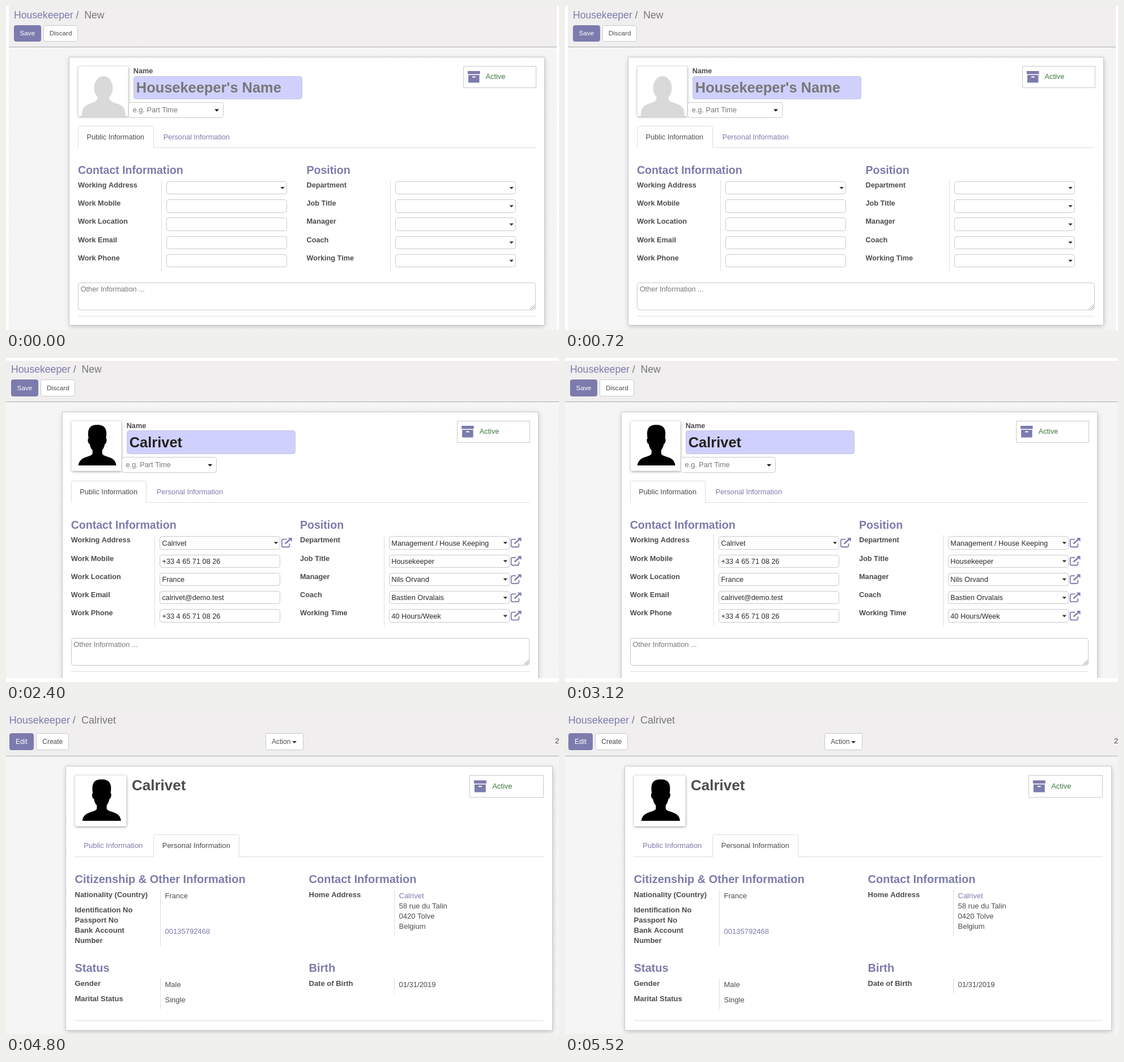
Recreate the animation shown at these times as an HTML page with a canvas. Size 976 by 573 pixels, loop 6 s.

```html
<!DOCTYPE html>
<html lang="en">
<head>
<meta charset="utf-8">
<title>Housekeeper form</title>
<style>
  html, body { margin: 0; width: 100%; height: 100%; overflow: hidden; background: #fff; }
  canvas { display: block; }
</style>
</head>
<body>
<canvas id="stage" width="976" height="573"></canvas>
<script>
const ctx = document.getElementById('stage').getContext('2d');
const BRAND = '#7c7bad', DARK = '#4c4c4c', INK = '#2b2b2b', HINT = '#777', EDGE = '#c9c9c9', RULE = '#ddd';
const COMPANY = 'Calrivet', PHONE = '+33 4 65 71 08 26', ACCOUNT = '00135792468';
const STEP = 1200;

// Current mapping from form units to stage pixels
let k = 1, ox = 0, oy = 0, fontScale = 1;
function view(scale, x, y, fs = scale * 0.978) {
  k = scale; ox = x; oy = y; fontScale = fs;
}
const X = x => x * k + ox;
const Y = y => y * k + oy;
const PX = x => Math.round(X(x));
const PY = y => Math.round(Y(y));

function text(str, x, y, { size = 13, color = DARK, bold = false, align = 'left' } = {}) {
  const s = size * fontScale;
  ctx.font = `${bold ? 'bold ' : ''}${s}px "Liberation Sans", Arial, sans-serif`;
  ctx.textAlign = align;
  ctx.fillStyle = color;
  ctx.fillText(str, X(x), Y(y) + s * 0.355);
}

function box(x0, y0, x1, y1, { r = 0, fill = '#fff', edge = EDGE, blur = 0, shade = 'rgba(0,0,0,.3)', drop = 1 } = {}) {
  const l = PX(x0) + 0.5, t = PY(y0) + 0.5;
  ctx.beginPath();
  ctx.roundRect(l, t, PX(x1) - l - 0.5, PY(y1) - t - 0.5, r);
  ctx.save();
  if (blur) {
    ctx.shadowColor = shade;
    ctx.shadowBlur = blur;
    ctx.shadowOffsetY = drop;
  }
  ctx.fillStyle = fill;
  ctx.fill();
  ctx.restore();
  ctx.strokeStyle = edge;
  ctx.lineWidth = 1;
  ctx.stroke();
}

function hline(x0, x1, y, color = RULE) {
  ctx.fillStyle = color;
  ctx.fillRect(PX(x0), PY(y), PX(x1) - PX(x0), 1);
}
function vline(x, y0, y1) {
  ctx.fillStyle = RULE;
  ctx.fillRect(PX(x), PY(y0), 1, PY(y1) - PY(y0));
}

function caret(x, y, w = 7.5, h = 4, color = '#333') {
  const cx = X(x), cy = Y(y);
  ctx.fillStyle = color;
  ctx.beginPath();
  ctx.moveTo(cx - w / 2, cy - h / 2);
  ctx.lineTo(cx + w / 2, cy - h / 2);
  ctx.lineTo(cx, cy + h / 2);
  ctx.fill();
}

// Draws in form units through the canvas transform
function scaled(draw) {
  ctx.save();
  ctx.translate(ox, oy);
  ctx.scale(k, k);
  draw();
  ctx.restore();
}

function linkIcon(x, y) {
  scaled(() => {
    ctx.translate(x, y);
    ctx.scale(1.05, 1.05);
    ctx.strokeStyle = ctx.fillStyle = BRAND;
    ctx.lineWidth = 1.7;
    ctx.beginPath();
    ctx.moveTo(0, -5.5);
    ctx.lineTo(-5.5, -5.5);
    ctx.quadraticCurveTo(-8, -5.5, -8, -3);
    ctx.lineTo(-8, 5);
    ctx.quadraticCurveTo(-8, 7.5, -5.5, 7.5);
    ctx.lineTo(2.5, 7.5);
    ctx.quadraticCurveTo(5, 7.5, 5, 5);
    ctx.lineTo(5, 1.5);
    ctx.stroke();
    ctx.lineWidth = 2.4;
    ctx.beginPath();
    ctx.moveTo(-2.5, 2);
    ctx.lineTo(6, -5.5);
    ctx.stroke();
    ctx.beginPath();
    ctx.moveTo(2.5, -8);
    ctx.lineTo(9, -8);
    ctx.lineTo(9, -1.5);
    ctx.fill();
  });
}

function greyPerson() {
  ctx.fillStyle = '#d9d9d9';
  ctx.beginPath();
  ctx.ellipse(172, 145, 16.5, 21, 0, 0, Math.PI * 2);
  ctx.fill();
  ctx.beginPath();
  ctx.moveTo(134, 194);
  ctx.bezierCurveTo(134, 178, 141, 175, 150, 172);
  ctx.bezierCurveTo(159, 169, 162, 168, 162, 158);
  ctx.lineTo(182, 158);
  ctx.bezierCurveTo(182, 168, 185, 169, 194, 172);
  ctx.bezierCurveTo(204, 175, 211, 178, 211, 194);
  ctx.fill();
}

function blackPerson() {
  ctx.fillStyle = '#000';
  ctx.beginPath();
  ctx.moveTo(158, 137);
  ctx.bezierCurveTo(155.5, 120, 160, 113.3, 173.3, 113.3);
  ctx.bezierCurveTo(187, 113.3, 191.5, 121, 188.8, 137);
  ctx.bezierCurveTo(191, 138, 189.5, 147, 186.7, 147);
  ctx.bezierCurveTo(185.5, 153, 183.5, 156, 182, 158);
  ctx.lineTo(182, 164);
  ctx.bezierCurveTo(183.5, 169, 194.5, 169, 201, 174);
  ctx.bezierCurveTo(205, 177, 206.2, 181, 206.7, 185);
  ctx.lineTo(140, 185);
  ctx.bezierCurveTo(140.5, 181, 142, 177, 146, 174);
  ctx.bezierCurveTo(152.5, 169, 163.5, 169, 165, 164);
  ctx.lineTo(165, 158);
  ctx.bezierCurveTo(163, 156, 161, 153, 160, 147);
  ctx.bezierCurveTo(157, 147, 155.5, 138, 158, 137);
  ctx.fill();
}

const tile = document.createElement('canvas');
tile.width = tile.height = 4;
const tc = tile.getContext('2d');
tc.fillStyle = '#fdfdfd';
tc.fillRect(0, 0, 4, 4);
tc.fillStyle = '#e7e7e7';
for (let i = 0; i < 4; i++) {
  tc.fillRect(i, i, 1, 1);
  tc.fillRect(i, (4 - i) % 4, 1, 1);
}
const weave = ctx.createPattern(tile, 'repeat');

function button(x0, x1, label, main) {
  box(x0, 33.5, x1, 62.7, main ? { r: 3, fill: BRAND, edge: BRAND } : { r: 3 });
  text(label, (x0 + x1) / 2, 48, { size: 12, color: main ? '#fff' : DARK, align: 'center' });
}

function page(title, left, titleY, bottom) {
  ctx.fillStyle = weave;
  ctx.fillRect(0, 0, 976, 573);
  ctx.fillStyle = '#f0eeee';
  ctx.fillRect(0, 0, 976, PY(72.4));
  hline(-30, 1020, 72.4, '#adacae');
  text('Housekeeper', left, titleY, { size: 18, color: BRAND });
  text('/', left + 109.5, titleY, { size: 18, color: HINT });
  text(title, left + 124.3, titleY, { size: 18, color: HINT });
  box(111, 90, 951, bottom, { edge: '#c8c8d3', blur: 9, shade: 'rgba(0,0,0,.24)', drop: 2 });
}

function avatar(known) {
  box(127, 105.6, 216, 194.6, { edge: '#e6e6e6', blur: 5, shade: 'rgba(0,0,0,.45)' });
  scaled(known ? blackPerson : greyPerson);
}

function activeBox() {
  box(807, 106, 935.5, 144.7);
  scaled(() => {
    ctx.fillStyle = BRAND;
    ctx.fillRect(815, 115, 21.5, 5.5);
    ctx.fillRect(816, 122, 19.5, 13.5);
    ctx.fillStyle = '#fff';
    ctx.fillRect(823, 124.5, 5.5, 2);
  });
  text('Active', 846.6, 124.8, { color: '#3c763d' });
}

function tabs(second, dy = 0) {
  hline(127, 935, 250 + dy);
  const [l, r] = second ? [262.6, 410.7] : [127, 260.5];
  const b = PY(250 + dy) + 1, t = PY(212 + dy) + 0.5;
  const x0 = PX(l) + 0.5, x1 = PX(r) - 0.5;
  ctx.beginPath();
  ctx.moveTo(x0, b);
  ctx.lineTo(x0, t + 3);
  ctx.quadraticCurveTo(x0, t, x0 + 3, t);
  ctx.lineTo(x1 - 3, t);
  ctx.quadraticCurveTo(x1, t, x1, t + 3);
  ctx.lineTo(x1, b);
  ctx.fillStyle = '#fff';
  ctx.fill();
  ctx.strokeStyle = RULE;
  ctx.stroke();
  text('Public Information', 142.5, 231.1 + dy, { color: second ? BRAND : DARK });
  text('Personal Information', 277.7, 231.1 + dy, { color: second ? DARK : BRAND });
}

const heading = (str, x, y) => text(str, x, y, { size: 20, color: BRAND, bold: true });
const label = (str, x, y) => text(str, x, y, { bold: true });

// kind: 'text', 'combo', 'link' (combo with a link icon) or 'select'
function field(right, top, name, kind, value = '') {
  const lx = right ? 530.5 : 127, x = right ? 686.8 : 282.8, mid = top + 11.7;
  name.split('|').forEach((part, i) => label(part, lx, top + 6.5 + i * 17.7));
  box(x, top, x + 213, top + 23.3, { r: 4 });
  if (kind === 'select') caret(x + 204.5, mid, 6, 6, '#111');
  else if (kind !== 'text') caret(x + 205.3, mid + 0.3);
  if (value) text(value, x + (kind === 'select' ? 8.5 : 4.7), mid, { color: INK });
  if (kind === 'link' && value) linkIcon(x + 224, mid - 0.7);
}

function editForm(known, second) {
  const left = known ? 21.6 : 14;
  page('New', left, 15.5, second ? 595.5 : 564.7);
  button(left, left + 47.7, 'Save', true);
  button(left + 52, left + 113.2, 'Discard');
  avatar(known);
  label('Name', 224.8, 114.3);
  box(224.8, 123.5, 523, 165.3, { r: 4, fill: '#d0d0ff', edge: '#c6c6dc' });
  text(known ? COMPANY : "Housekeeper's Name", 229.8, 144, { size: 26, color: known ? '#222' : HINT, bold: true });
  box(215.8, 170.3, 384.3, 197.5, { r: 4 });
  text('e.g. Part Time', 223.7, 183.8, { color: HINT });
  caret(372, 184.7, 8, 4.2, '#111');
  activeBox();
  tabs(second);
  if (second) personalFields(known); else publicFields(known);
}

function publicFields(known) {
  const left = [
    ['Working Address', 'link', COMPANY], ['Work Mobile', 'text', PHONE],
    ['Work Location', 'text', 'France'], ['Work Email', 'text', 'calrivet@demo.test'],
    ['Work Phone', 'text', PHONE]
  ];
  const right = [
    ['Department', 'Management / House Keeping'], ['Job Title', 'Housekeeper'],
    ['Manager', 'Nils Orvand'], ['Coach', 'Bastien Orvalais'], ['Working Time', '40 Hours/Week']
  ];
  heading('Contact Information', 127, 289.8);
  heading('Position', 530.5, 289.8);
  vline(274.4, 308, 469);
  vline(678, 308, 469);
  left.forEach(([n, kind, v], i) => field(false, 310 + i * 32.2, n, kind, known ? v : ''));
  right.forEach(([n, v], i) => field(true, 310 + i * 32.2, n, 'link', known ? v : ''));
  box(127, 489, 935, 538, { r: 4 });
  text('Other Information ...', 131.7, 500.7, { color: HINT });
  scaled(() => {
    ctx.strokeStyle = '#888';
    ctx.lineWidth = 1;
    ctx.beginPath();
    for (const d of [8, 4]) {
      ctx.moveTo(933.5 - d, 536.5);
      ctx.lineTo(933.5, 536.5 - d);
    }
    ctx.stroke();
  });
  hline(127, 935, 548);
}

function personalFields(known) {
  const v = s => known ? s : '';
  heading('Citizenship & Other Information', 127, 289.8);
  heading('Contact Information', 530.5, 289.8);
  vline(274.4, 308, 439);
  vline(678, 308, 340);
  field(false, 310, 'Nationality (Country)', 'combo', v('France'));
  field(false, 342.2, 'Identification No', 'text');
  field(false, 374.4, 'Passport No', 'text');
  field(false, 406.6, 'Bank Account|Number', 'link', v(ACCOUNT));
  field(true, 310, 'Home Address', 'link', v(COMPANY));
  heading('Status', 127, 478.3);
  heading('Birth', 530.5, 478.3);
  vline(274.4, 496.5, 559);
  vline(678, 496.5, 528.5);
  field(false, 498.5, 'Gender', 'select', v('Male'));
  field(false, 529.9, 'Marital Status', 'select', v('Single'));
  field(true, 498.7, 'Date of Birth', 'combo', v('01/31/2019'));
  hline(127, 935, 578.5);
}

function savedForm() {
  page(COMPANY, 14, 11, 547.3);
  button(14, 56.3, 'Edit', true);
  button(60.6, 116.9, 'Create');
  avatar(true);
  activeBox();
  tabs(true, -3.6);

  view(1, 0, 0, 1);
  box(458, 41, 525, 71, { r: 3 });
  text('Action', 469, 56, { size: 12 });
  caret(509, 57, 8, 4);
  text('2', 969, 54.5);
  text(COMPANY, 222, 133, { size: 26, bold: true });

  heading('Citizenship & Other Information', 121.5, 299);
  heading('Contact Information', 534.5, 299);
  heading('Status', 121.5, 456);
  heading('Birth', 534.5, 456);
  vline(272, 318, 417);
  vline(685, 318, 399);
  vline(272, 475, 529);
  vline(685, 475, 502);
  label('Nationality (Country)', 121.5, 326.4);
  ['Identification No', 'Passport No', 'Bank Account', 'Number']
    .forEach((s, i) => label(s, 121.5, 353.4 + i * 18));
  label('Home Address', 534.5, 326.4);
  label('Gender', 121.5, 483.4);
  label('Marital Status', 121.5, 510.4);
  label('Date of Birth', 534.5, 483.4);
  text('France', 280.5, 328.4);
  text(ACCOUNT, 280.5, 391.4, { color: BRAND });
  [COMPANY, '58 rue du Talin', '0420 Tolve', 'Belgium']
    .forEach((s, i) => text(s, 693.5, 328.4 + i * 18, { color: i ? DARK : BRAND }));
  text('Male', 280.5, 485.4);
  text('Single', 280.5, 512.4);
  text('01/31/2019', 693.5, 485.4);
  hline(122, 948, 549);
}

// Each scene: visible area [x, y, w, h], view [scale, x, y], drawing
const scenes = [
  { area: [5, 0, 967, 573], at: [1, 0, 0], draw: () => editForm(false, false) },
  { area: [27, 0, 923, 573], at: [0.9585, 21.5, -2], draw: () => editForm(false, true) },
  { area: [0, 5, 976, 561], at: [1.002, -12.6, 4.7], draw: () => editForm(true, false) },
  { area: [0, 4, 976, 558], at: [1.002, -10.7, 1], draw: () => editForm(true, true) },
  { area: [0, 0, 976, 573], at: [1.0238, -8.6, 6.7], draw: savedForm }
];

function show({ area, at, draw }) {
  ctx.fillStyle = '#fff';
  ctx.fillRect(0, 0, 976, 573);
  ctx.save();
  ctx.beginPath();
  ctx.rect(...area);
  ctx.clip();
  view(...at);
  draw();
  ctx.restore();
}

let current = -1;
const start = performance.now();
function tick() {
  const t = Math.max(0, performance.now() - start);
  const i = Math.floor(t / STEP) % scenes.length;
  if (i !== current) show(scenes[current = i]);
  requestAnimationFrame(tick);
}
tick();
</script>
</body>
</html>
```
